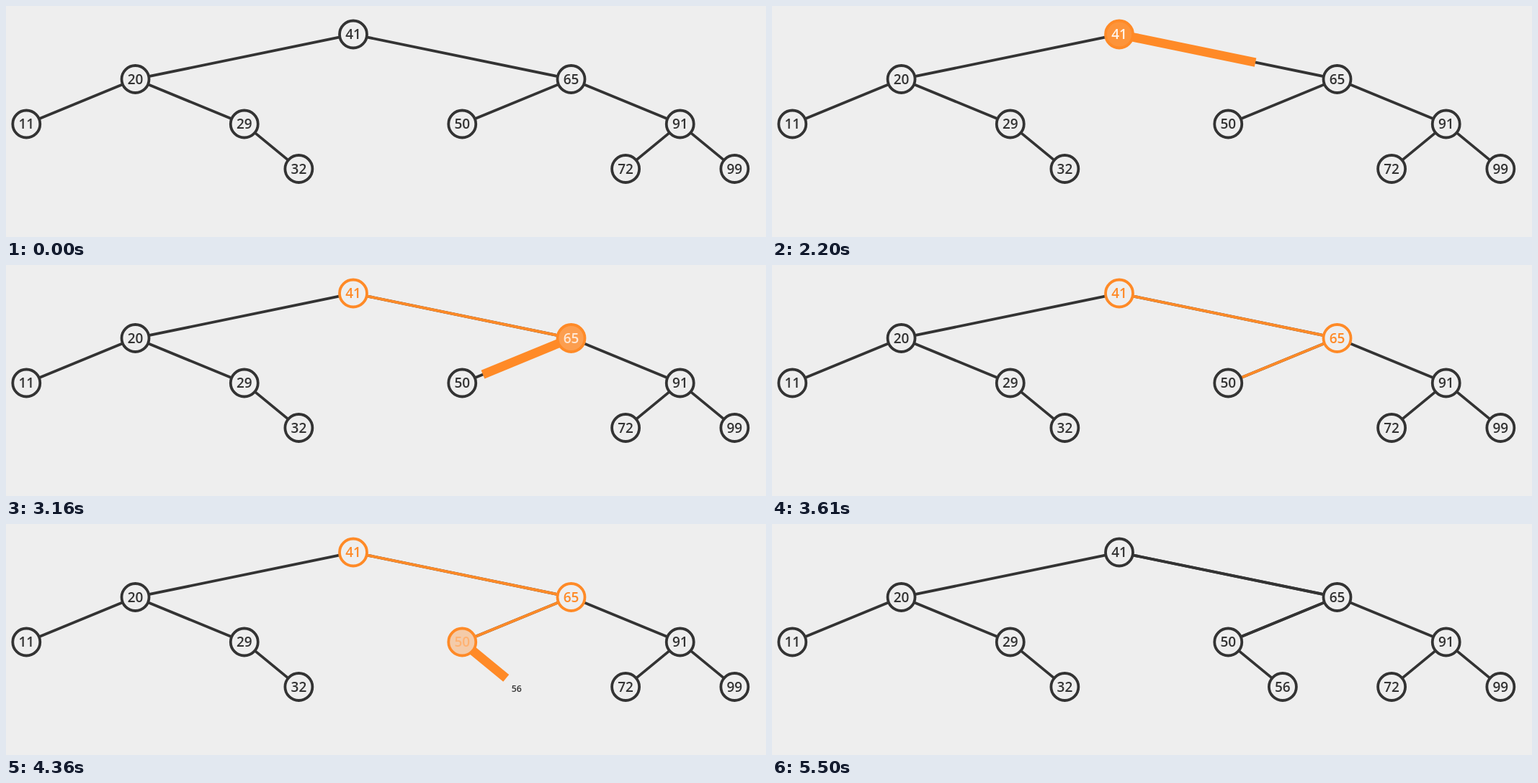
An HTML page that plays this animation: 1055x322 px, repeating every 7.03 s.

```html
<!DOCTYPE html>
<html lang="en">
<head>
<meta charset="utf-8">
<title>Search tree insertion</title>
<style>
  html, body { margin: 0; width: 100%; height: 100%; overflow: hidden; background: #eee; }
  svg { display: block; width: 1055px; height: 322px; }
  text { font-family: "Open Sans", "Noto Sans", sans-serif; font-weight: 600; text-anchor: middle; }
</style>
</head>
<body>
<svg id="stage" viewBox="0 0 1055 322"></svg>
<script>
const LOOP = 7030, R = 19, THIN = 3.78, THICK = 12.6, FONT = 19;
const BG = [238, 238, 238], DARK = [51, 51, 51], ORANGE = [255, 138, 39], WHITE = [255, 255, 255];

// Tree position of each key: column, level
const KEYS = {
  41: [6, 0], 20: [2, 1], 65: [10, 1], 11: [0, 2], 29: [4, 2], 50: [8, 2],
  91: [12, 2], 32: [5, 3], 56: [9, 3], 72: [11, 3], 99: [13, 3]
};
const LINKS = [[41, 20], [41, 65], [20, 11], [20, 29], [29, 32], [65, 50], [65, 91], [91, 72], [91, 99]];

// Highlight, then fade to outline: [start, duration]
const VISITS = {
  41: { on: [1610, 290], off: [1995, 500] },
  65: { on: [2598, 290], off: [2965, 500] },
  50: { on: [3570, 350], off: [4082, 500] }
};
// Edge sweep and thinning: [start, duration]
const WALKS = [
  { link: [41, 65], sweep: [1995, 260], thin: [2260, 400] },
  { link: [65, 50], sweep: [2965, 260], thin: [3225, 265] },
  { link: [50, 56], sweep: [4082, 260], thin: [4350, 480] }
];
const GROW = [4082, 500], INSERT = [4800, 230], RESET = [5050, 450];

// Redraw bursts: first, last, count
const BURSTS = [
  [1720, 1920, 4], [2060, 2690, 9], [2690, 2750, 2], [2810, 3490, 11],
  [3610, 3960, 6], [4160, 4830, 11], [4900, 5500, 10]
];

const stage = document.getElementById('stage');
const pos = key => [28.3 + 75.62 * KEYS[key][0], 39.5 + 62.5 * KEYS[key][1]];
const mix = (a, b, p) => a.map((v, i) => v + (b[i] - v) * p);
const rgb = c => `rgb(${c.map(Math.round).join()})`;

function set(node, attrs) {
  for (const name in attrs) node.setAttribute(name, attrs[name]);
  return node;
}

function add(tag, attrs) {
  return stage.appendChild(set(document.createElementNS('http://www.w3.org/2000/svg', tag), attrs));
}

function ease(t, [start, duration]) {
  const p = Math.min(1, Math.max(0, (t - start) / duration));
  return p < 0.5 ? 4 * p ** 3 : 1 - 4 * (1 - p) ** 3;
}

function snap(t) {
  let out = 0;
  for (const [first, last, count] of BURSTS) {
    if (t < first) break;
    const step = (last - first) / (count - 1);
    out = Math.min(last, first + Math.floor((t - first + 5) / step) * step);
  }
  return out;
}

// Line between two node rims, drawn up to share p
function span([from, to], p) {
  const [x1, y1] = pos(from), [x2, y2] = pos(to);
  const length = Math.hypot(x2 - x1, y2 - y1);
  const ux = (x2 - x1) / length, uy = (y2 - y1) / length;
  const end = R + (length - 2 * R) * p;
  return { x1: x1 + ux * R, y1: y1 + uy * R, x2: x1 + ux * end, y2: y1 + uy * end };
}

for (const link of LINKS) add('line', { ...span(link, 1), stroke: rgb(DARK), 'stroke-width': THIN });
for (const walk of WALKS) walk.line = add('line', {});

const nodes = {};
for (const key in KEYS) {
  const [x, y] = pos(key);
  const circle = add('circle', { cx: x, cy: y, r: R, fill: rgb(BG), stroke: rgb(DARK), 'stroke-width': THIN });
  const label = add('text', { x, y: y + 6.7, 'font-size': FONT, fill: rgb(DARK) });
  label.textContent = key;
  nodes[key] = { circle, label };
}

function paint(key, fill, stroke, ink, reset) {
  const { circle, label } = nodes[key];
  set(circle, { fill: rgb(mix(fill, BG, reset)), stroke: rgb(mix(stroke, DARK, reset)) });
  set(label, { fill: rgb(mix(ink, DARK, reset)) });
}

function draw(t) {
  const reset = ease(t, RESET);

  for (const key in VISITS) {
    const on = ease(t, VISITS[key].on), off = ease(t, VISITS[key].off);
    paint(key, mix(BG, ORANGE, on * (1 - off)), mix(DARK, ORANGE, on),
      mix(mix(DARK, WHITE, on), ORANGE, off), reset);
  }

  for (const { link, sweep, thin, line } of WALKS) {
    const p = ease(t, sweep);
    set(line, {
      ...span(link, p),
      stroke: rgb(mix(ORANGE, DARK, reset)),
      'stroke-width': THICK + (THIN - THICK) * ease(t, thin),
      visibility: p > 0 ? 'visible' : 'hidden'
    });
  }

  const on = ease(t, INSERT), size = ease(t, GROW);
  paint(56, mix(BG, ORANGE, on), mix(BG, ORANGE, on), mix(DARK, WHITE, on), reset);
  set(nodes[56].circle, { visibility: on > 0.02 ? 'visible' : 'hidden' });
  set(nodes[56].label, { 'font-size': FONT * size, visibility: size > 0 ? 'visible' : 'hidden' });
}

const begin = performance.now();
function frame() {
  draw(snap((performance.now() - begin) % LOOP));
  requestAnimationFrame(frame);
}
frame();
</script>
</body>
</html>
```
